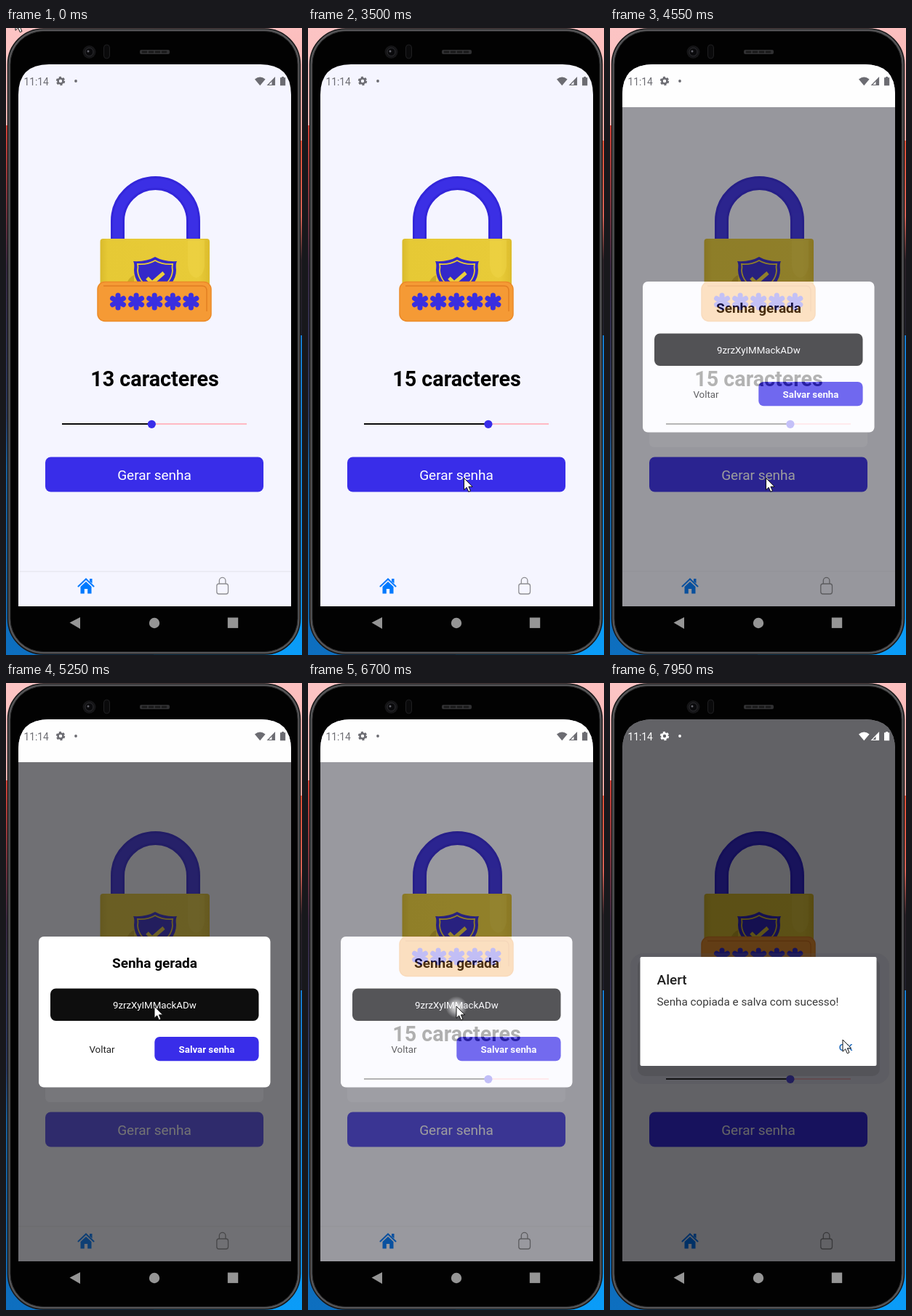
These frames come from a looping animation (407x863 px, 8 s). An HTML page:

```html
<!DOCTYPE html>
<html lang="pt">
<head>
<meta charset="utf-8">
<title>Gerador de senha</title>
<style>
html, body { margin: 0; width: 100%; height: 100%; overflow: hidden; background: #000; }
svg { display: block; width: 407px; height: 863px; font-family: Roboto, sans-serif; }
.mid { text-anchor: middle; }
.b { font-weight: 700; }
.m { font-weight: 500; }
</style>
</head>
<body>
<svg viewBox="0 0 407 863">
<defs>
  <linearGradient id="wallL" x2="0" y2="1">
    <stop offset="0" stop-color="#fcc4c4"/><stop offset=".155" stop-color="#fbbfbd"/>
    <stop offset=".155" stop-color="#e2473c"/><stop offset=".38" stop-color="#3b2a45"/>
    <stop offset=".62" stop-color="#2b3d68"/><stop offset=".7" stop-color="#1766a8"/>
    <stop offset="1" stop-color="#0d6fc0"/>
  </linearGradient>
  <linearGradient id="wallR" x2="0" y2="1">
    <stop offset="0" stop-color="#fcc0c0"/><stop offset=".18" stop-color="#f9b0a8"/>
    <stop offset=".18" stop-color="#f0563c"/><stop offset=".3" stop-color="#e86a5c"/>
    <stop offset=".37" stop-color="#2a2028"/><stop offset=".49" stop-color="#20202c"/>
    <stop offset=".49" stop-color="#1685e0"/><stop offset="1" stop-color="#0a9cf8"/>
  </linearGradient>
  <linearGradient id="gold" x2="1" y2="0">
    <stop offset="0" stop-color="#d9ba2c"/><stop offset=".07" stop-color="#e6c935"/>
    <stop offset=".9" stop-color="#e8cb38"/><stop offset="1" stop-color="#dcbc2c"/>
  </linearGradient>
  <radialGradient id="glow">
    <stop offset="0" stop-color="#fff" stop-opacity=".85"/><stop offset=".45" stop-color="#fff" stop-opacity=".55"/>
    <stop offset="1" stop-color="#fff" stop-opacity="0"/>
  </radialGradient>
  <clipPath id="screen"><path d="M17 796V92Q17 50 59 50H350Q392 50 392 92V796Z"/></clipPath>
  <path id="arm" d="M0 0V-8.6" stroke="#3a2fe0" stroke-width="7" stroke-linecap="round"/>
</defs>

<!-- wallpaper and phone -->
<rect width="204" height="863" fill="url(#wallL)"/>
<rect x="203" width="204" height="863" fill="url(#wallR)"/>
<rect x="2.5" y="1" width="402" height="861" rx="49" fill="#555557" stroke="#161617" stroke-width="1.5"/>
<rect x="6" y="4.500" width="395" height="854" rx="45.500" fill="#020202" stroke="#242425"/>
<circle cx="114.500" cy="33" r="9" fill="#151517"/>
<circle cx="114.500" cy="33" r="5.500" fill="#0a0a0c" stroke="#2c2c30"/>
<circle cx="113" cy="32" r="1.500" fill="#66666e"/>
<rect x="134.500" y="23" width="8" height="19" rx="4" fill="#0a0a0b" stroke="#1f1f21"/>
<rect x="184" y="30" width="41" height="6" rx="2" fill="#303032"/>
<path d="M187 33H223" stroke="#1a1a1b" stroke-width="3" stroke-dasharray="7 2"/>

<g clip-path="url(#screen)">
  <rect x="17" y="50" width="375" height="746" fill="#f5f5ff"/>

  <!-- padlock -->
  <g fill="none" stroke-width="19">
    <path d="M153.500 296V265.500a52 52 0 0 1 104 0V296" stroke="#3326da"/>
    <path d="M153.500 296V265.500a52 52 0 0 1 104 0V296" stroke="#3b2fe5" stroke-width="13"/>
  </g>
  <rect x="129.500" y="290" width="150.500" height="70" rx="4" fill="url(#gold)"/>
  <path d="M250 292v35q1 14 11 17 10-2 12-16V292Z" fill="#efd64c" opacity=".4"/>
  <path d="M166 352q2-8 10-12v12Z" fill="#cbab25"/>
  <path d="M205 315q12 7 30 6-2 3-1 12 0 22-29 34-29-12-29-34 1-9-1-12 18 1 30-6Z" fill="#3428c9"/>
  <path d="M205 320q10 6 24 5-1 4 0 9-1 17-24 28-23-11-24-28 1-5 0-9 14 1 24-5Z" fill="none" stroke="#e6c935" stroke-width="1.800"/>
  <path d="M194 344l7 7 16-14" fill="none" stroke="#ebcf3a" stroke-width="5"/>
  <rect x="126" y="349.500" width="156" height="54" rx="10" fill="#f59a35" stroke="#ec8a28" stroke-width="1.500"/>
  <path d="M134 355H270q6 0 6 7V390" fill="none" stroke="#e17e22" stroke-width="1.400"/>
  <g id="stars"></g>

  <text id="count" class="mid b" x="204.500" y="493" font-size="28.700"></text>
  <path id="rest" stroke="#ffb9c4" stroke-width="2"/>
  <path id="fill" stroke="#0a0a0a" stroke-width="2"/>
  <circle id="thumb" cy="545.300" r="5.600" fill="#392de9"/>
  <g id="button">
    <rect x="54" y="590.500" width="300" height="48" rx="7.500" fill="#392de9"/>
    <text class="mid" x="204" y="622" font-size="19" fill="#fff">Gerar senha</text>
  </g>

  <!-- tabs -->
  <path id="rule" d="M17 748H392" stroke="#e2e2ea"/>
  <g fill="#007aff">
    <path d="M99.500 768.500 110 758.500 120.500 768.500" fill="none" stroke="#007aff" stroke-width="2" stroke-linecap="round"/>
    <path d="M115 758h3.500v6.500l-3.500-3Z"/>
    <path d="M102.500 769 110 762l7.500 7v9.500h-5.300V772h-4.400v6.500h-5.300Z"/>
  </g>
  <g fill="none" stroke="#8e8e93" stroke-width="1.300">
    <rect x="289.800" y="765" width="15.700" height="14" rx="3"/>
    <path d="M293.300 765v-4.300a4.300 4.300 0 0 1 8.600 0V765"/>
  </g>

  <!-- password sheet -->
  <rect id="topBar" x="17" y="50" width="375" height="59" fill="#fefefe"/>
  <g id="sheet">
    <rect x="17" y="109" width="375" height="687" fill="#181818" opacity=".6"/>
    <path d="M54 556H354V570q0 7-7 7H61q-7 0-7-7Z" fill="#fff" opacity=".05"/>
    <rect x="45" y="349" width="318.500" height="207.500" rx="7" fill="#fff"/>
    <text class="mid b" x="204.500" y="392" font-size="19">Senha gerada</text>
    <rect x="61" y="420.500" width="286.500" height="44.500" rx="7.500" fill="#0e0e0e"/>
    <text class="mid" x="204.300" y="448" font-size="13.300" fill="#fff">9zrzXyIMMackADw</text>
    <text class="mid" x="132" y="509" font-size="13.300" fill="#222">Voltar</text>
    <rect x="204.300" y="487" width="143.300" height="33.300" rx="7" fill="#392de9"/>
    <text class="mid b" x="276" y="509" font-size="13.300" fill="#fff">Salvar senha</text>
  </g>

  <!-- alert -->
  <g id="alert">
    <rect x="17" y="50" width="375" height="746" opacity=".6"/>
    <rect x="28" y="372" width="356" height="180" rx="18" fill="#4c4b56" opacity=".2"/>
    <rect x="38" y="380" width="333" height="161" rx="10" fill="#333" opacity=".2"/>
    <rect x="41.500" y="377" width="325" height="150" rx="2" fill="#fff"/>
    <text class="m" x="64.500" y="415" font-size="19" fill="#202020">Alert</text>
    <text x="64.500" y="444" font-size="15.270" fill="#3a3a3a">Senha copiada e salva com sucesso!</text>
    <text class="m" x="314.800" y="505.500" font-size="13.300" letter-spacing="1.100" fill="#1b69bd">OK</text>
  </g>

  <!-- status bar -->
  <g id="status">
    <text x="24.500" y="78.500" font-size="13.800">11:14</text>
    <circle cx="75" cy="73" r="3.500" fill="none" stroke="currentColor" stroke-width="2.600"/>
    <circle cx="75" cy="73" r="5.200" fill="none" stroke="currentColor" stroke-width="2" stroke-dasharray="3 2.445"/>
    <circle cx="96" cy="73" r="1.900"/>
    <path d="M342 70.500q7.300-6 14.600 0l-7.300 8.800Z"/>
    <path d="M360 78.500 369.500 68.500V78.500Z" fill="none" stroke="currentColor" stroke-width="1.200"/>
    <path d="M365.500 73 370 68V79h-4.500Z"/>
    <path d="M377 68.300h2.200V67h2.800v1.300h2.200V79.300H377Z"/>
  </g>
</g>

<!-- system buttons -->
<g fill="#959595">
  <path d="M87.500 818.500 102 811V827Z"/>
  <circle cx="204" cy="819" r="7.200"/>
  <rect x="304.800" y="811.500" width="14.400" height="14.400"/>
</g>

<g id="touch">
  <circle r="15" fill="url(#glow)"/>
  <circle r="11" fill="none" stroke="#777788" stroke-opacity=".3"/>
</g>
<path id="cursor" d="M0 0V16.300L3.700 12.800 6.300 18.800 9 17.600 6.400 11.800H11.600Z" fill="#fff" stroke="#111"/>
</svg>

<script>
const LOOP = 8000, STEP = 50;
const el = id => document.getElementById(id);
const set = (id, attrs) => {
  for (const k in attrs) el(id).setAttribute(k, attrs[k]);
};
const smooth = u => u * u * (3 - 2 * u);
const ramp = (t, from, to) => Math.min(1, Math.max(0, (t - from) / (to - from)));
const during = (t, from, to) => t >= from && t < to ? 1 : 0;

// Pointer moves: from, to, then the place reached
const origin = { x: 13, y: -13 };
const moves = [
  { from: 150, to: 1600, x: 200, y: 534 },    // down to the slider
  { from: 1600, to: 1750, x: 200, y: 545 },
  { from: 1900, to: 2650, x: 248, y: 545 },   // drag
  { from: 3100, to: 3500, x: 214.5, y: 619.5 },
  { from: 4950, to: 5250, x: 204, y: 445 },   // onto the password
  { from: 7000, to: 7350, x: 320, y: 491 }    // onto OK
];

function pointer(t) {
  return moves.reduce((p, m) => {
    const u = smooth(ramp(t, m.from, m.to));
    return { x: p.x + (m.x - p.x) * u, y: p.y + (m.y - p.y) * u };
  }, origin);
}

for (let i = 0; i < 5; i++)
  for (let turn = 0; turn < 360; turn += 60)
    el("stars").innerHTML += `<use href="#arm" transform="translate(${154 + 25.1 * i} 376.5) rotate(${turn})"/>`;

function draw(t) {
  const { x, y } = pointer(t);
  const sheet = ramp(t, 4375, 4600) ** 1.4 - ramp(t, 6575, 6800) ** 2;
  const warn = ramp(t, 6700, 6850);
  const chars = 13 + Math.round(2 * smooth(ramp(t, 1900, 2650)));
  const knob = 200.3 + (chars - 13) * 23.8;
  const tap = during(t, 4200, 4400);
  const touch = Math.max(during(t, 1900, 2650), tap, during(t, 6150, 7000) * (1 - .4 * warn));
  const ink = warn > .4 ? "#fff" : "#6c6c72";

  el("count").textContent = chars + " caracteres";
  set("thumb", { cx: knob });
  set("fill", { d: `M77 545H${knob}` });
  set("rest", { d: `M${knob} 545H331` });
  set("button", { opacity: 1 - .6 * tap - .15 * during(t, 4600, 6800) });
  set("rule", { opacity: t < 150 ? 1 : sheet * .7 });
  set("sheet", { opacity: sheet });
  set("topBar", { opacity: sheet > 0 ? 1 : 0 });
  set("alert", { opacity: warn });
  set("status", { fill: ink, color: ink });
  set("touch", { transform: `translate(${x} ${y + 1})`, opacity: touch });
  set("cursor", { transform: `translate(${x} ${y})` });
}

const start = performance.now();
function tick() {
  const t = (performance.now() - start) % LOOP;
  draw(Math.floor(t / STEP) * STEP);
  requestAnimationFrame(tick);
}
tick();
</script>
</body>
</html>
```
